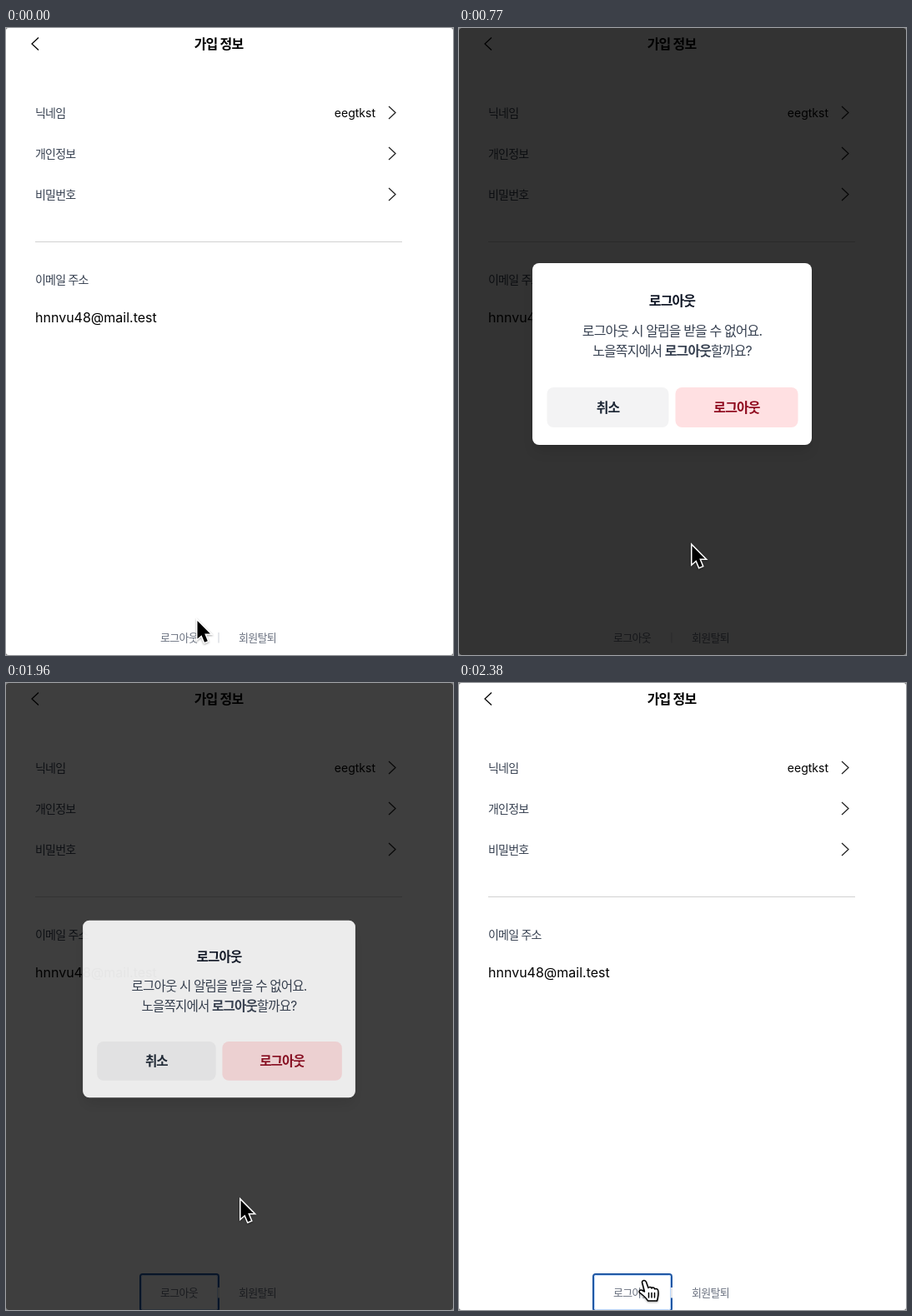
Animation of 536 by 752 pixels, one loop 2.52 s. Source, as an HTML page:

```html
<!DOCTYPE html>
<html lang="ko">
<head>
<meta charset="utf-8">
<title>가입 정보</title>
<style>
  html, body { margin: 0; width: 100%; height: 100%; overflow: hidden; background: #777; }
  #stage { position: relative; width: 536px; height: 752px; overflow: hidden; border-radius: 3px; background: #fff; }
  svg { position: absolute; left: 0; top: 0; overflow: visible; }
  text { font: 14px Inter, "Noto Sans CJK KR", sans-serif; fill: #374151; }
  .ko { letter-spacing: -.056em; }
  .mid { text-anchor: middle; }
  .big { font-size: 16px; }
  .small { font-size: 13px; fill: #6b7280; }
  .bold { font-weight: 600; }
  .black { fill: #000; }
  .line { fill: none; stroke: #222; stroke-width: 1.25; }
  .ring { fill: none; stroke: #1f57a4; stroke-width: 2; visibility: hidden; }
  .glow { fill: none; stroke: #bcd7fa; stroke-width: 1; }
  .ring.on { visibility: visible; }
  #shade { position: absolute; inset: 0; background: #000; opacity: 0; }
  #dialog {
    position: absolute; left: 87.5px; top: 282px; width: 335px; height: 218px;
    border-radius: 8px; background: #fff; opacity: 0;
    box-shadow: 0 10px 15px -3px rgba(0,0,0,.1), 0 4px 6px -4px rgba(0,0,0,.1);
  }
  #pointer { filter: drop-shadow(0 1.5px 1px rgba(0,0,0,.35)); }
</style>
</head>
<body>
<div id="stage">
  <svg width="536" height="752">
    <path class="line" style="stroke:#000" d="M39 11.5 31 19 39 26.5"/>
    <text class="ko mid big bold black" x="255" y="24.6">가입 정보</text>

    <text class="ko" x="35" y="106.5">닉네임</text>
    <text class="black" x="443" y="106.5" text-anchor="end">eegtkst</text>
    <text class="ko" x="35" y="155.5">개인정보</text>
    <text class="ko" x="35" y="204.5">비밀번호</text>
    <path class="line" d="M459 94l8 7.5-8 7.5M459 143l8 7.5-8 7.5M459 192l8 7.5-8 7.5"/>

    <path d="M35 256.5H475" stroke="#d1d1d1"/>
    <text class="ko" x="35" y="306.5">이메일 주소</text>
    <text class="big black" x="35" y="352.6">hnnvu48@mail.test</text>

    <g class="ring" id="logoutRing">
      <rect x="161" y="709" width="94" height="44" rx="3"/>
      <rect class="glow" x="162.5" y="710.5" width="91" height="41" rx="2"/>
    </g>
    <path d="M255 725V737.5" stroke="#e5e7eb" stroke-width="2"/>
    <text class="ko small" x="185" y="735.8">로그아웃</text>
    <text class="ko small" x="279" y="735.8">회원탈퇴</text>
  </svg>

  <div id="shade"></div>

  <div id="dialog">
    <svg width="335" height="218">
      <text class="ko mid big bold" style="fill:#111827" x="167.5" y="50.6">로그아웃</text>
      <text class="ko mid big" x="167.5" y="86.8">로그아웃 시 알림을 받을 수 없어요.</text>
      <text class="ko mid big" x="167.5" y="110.8">노을쪽지에서 <tspan class="bold">로그아웃</tspan>할까요?</text>
      <rect x="17.5" y="149" width="146" height="48" rx="8" fill="#f3f3f4"/>
      <rect x="171.5" y="149" width="147" height="48" rx="8" fill="#ffe0e2"/>
      <g class="ring" id="cancelRing">
        <rect x="17.5" y="149" width="146" height="48" rx="8"/>
        <rect class="glow" x="19" y="150.5" width="143" height="45" rx="7"/>
      </g>
      <g class="ring" id="confirmRing">
        <rect x="171.5" y="149" width="147" height="48" rx="8"/>
        <rect class="glow" x="173" y="150.5" width="144" height="45" rx="7"/>
      </g>
      <text class="ko mid big bold" style="fill:#1f2937" x="90.5" y="178.7">취소</text>
      <text class="ko mid big bold" style="fill:#8f0a1e" x="245" y="178.7">로그아웃</text>
    </svg>
  </div>

  <svg width="536" height="752">
    <g id="pointer">
      <path id="arrow" d="M0 0V21.5L5 17.2 8.6 25.8 12.3 24.2 8.7 15.6H15.4Z"
        stroke="#fff" stroke-width="3" paint-order="stroke"/>
      <g id="hand" fill="#fff" stroke="#000" stroke-width="1.5" stroke-linejoin="round" stroke-linecap="round">
        <path d="M-3 2C-2.5-.5 1-1 2 2L4.5 9C5 7.5 8 7.5 8.5 9.5 9.5 8 12 8.5 12.3 10.5 13.5 9.5 16 10 16.3 12.5 17 17 16.5 19 15 24.5H4C2 21-1.5 18-6 14.5-7.5 12.5-5 10.8-2.8 12L0 13.5Z"/>
        <path d="M5 15v5.5M8.5 15v5.5M12 15v5.5"/>
      </g>
    </g>
  </svg>
</div>

<script>
const LOOP = 2520, TICK = 70;
const $ = id => document.getElementById(id);

const span = (t, from, length) => Math.min(1, Math.max(0, (t - from) / length));
const easeIn = p => p ** 3;
const easeOut = p => 1 - (1 - p) ** 3;
const smooth = p => p * p * (3 - 2 * p);
const within = (t, from, to) => t >= from && t < to;

// Where the pointer rests, and when it leaves for and reaches each place
const home = { x: 229.5, y: 711 };
const stops = [
  { leave: 0, reach: 420, x: 223.5, y: 726 },
  { leave: 490, reach: 770, x: 279.5, y: 621 },
  { leave: 770, reach: 1120, x: 281.5, y: 610.5 },
  { leave: 1610, reach: 1750, x: 281.5, y: 620.5 },
  { leave: 2030, reach: 2380, x: 222.5, y: 716.5 }
];

function tipAt(t) {
  let { x, y } = home;
  for (const s of stops) {
    const p = smooth(span(t, s.leave, s.reach - s.leave));
    x += (s.x - x) * p;
    y += (s.y - y) * p;
  }
  return [x, y];
}

function render(t) {
  const shade = easeOut(span(t, 467, 110)) - easeIn(span(t, 1896, 168));
  const fade = easeOut(span(t, 450, 110)) - easeIn(span(t, 1890, 152));
  $('shade').style.opacity = .8 * shade;
  $('dialog').style.opacity = fade;
  $('dialog').style.transform = `scale(${.75 + .25 * fade})`;

  const onConfirm = within(t, 1330, 1540);
  $('confirmRing').classList.toggle('on', onConfirm);
  $('cancelRing').classList.toggle('on', within(t, 1120, 1960) && !onConfirm);
  $('logoutRing').classList.toggle('on', t >= 1960);

  const overLink = within(t, 70, 490) || t >= 2380;
  $('hand').style.display = overLink ? '' : 'none';
  $('arrow').style.display = overLink ? 'none' : '';
  $('pointer').setAttribute('transform', `translate(${tipAt(t)})`);
}

const start = performance.now();
function loop() {
  const t = (performance.now() - start) % LOOP;
  render(Math.floor(t / TICK) * TICK);
  requestAnimationFrame(loop);
}
loop();
</script>
</body>
</html>
```
